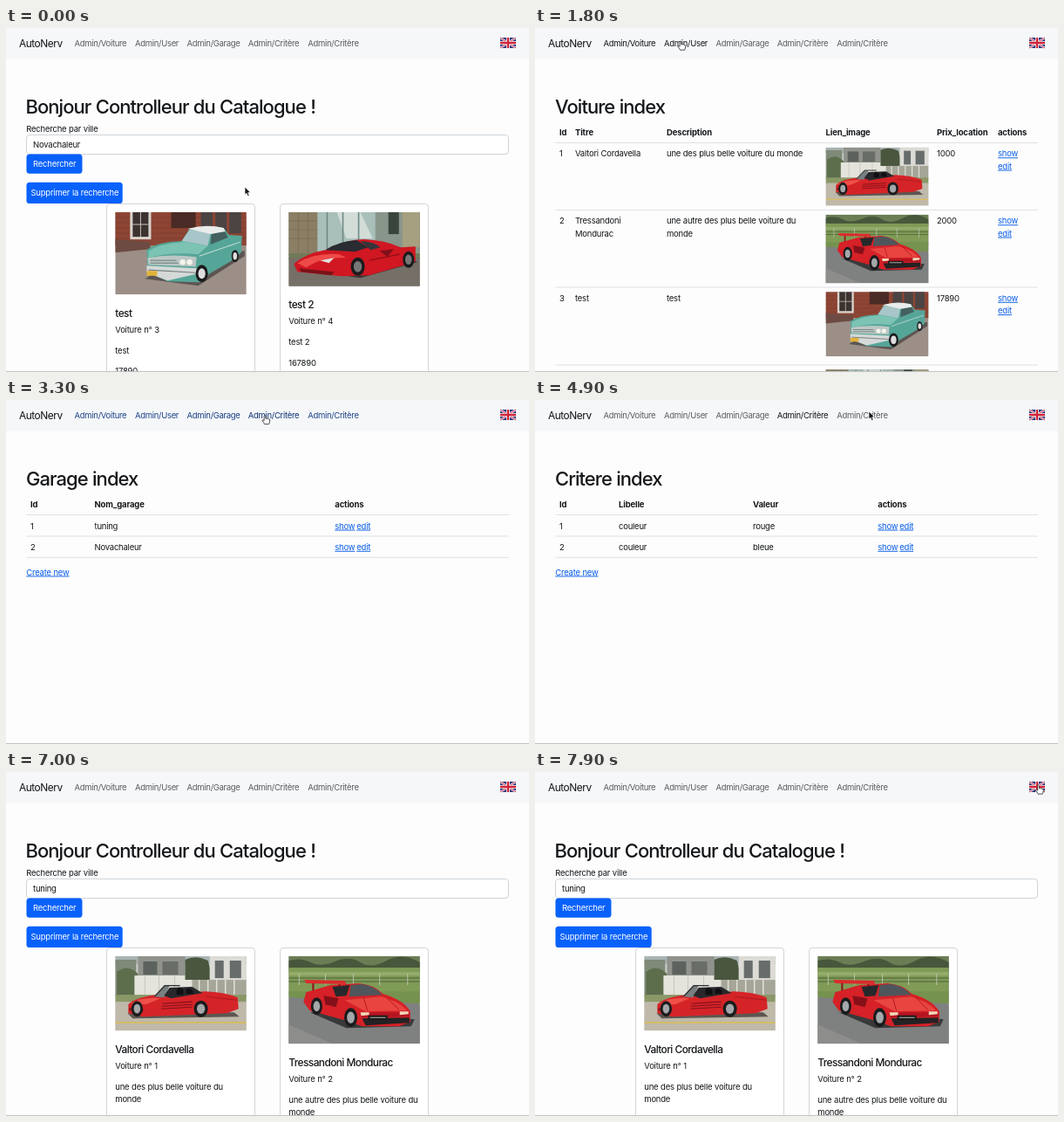
An HTML page that plays this animation: 600 px wide and 394 px high, repeating every 8000 ms.

```html
<!DOCTYPE html>
<html lang="fr">
<head>
<meta charset="utf-8">
<title>Catalogue</title>
<style>
html, body { margin: 0; width: 100%; height: 100%; overflow: hidden; background: #fdfdfd; }
svg { display: block; width: 600px; height: 394px; }
text { font-family: Inter, "Liberation Sans", sans-serif; font-size: 9.5px; letter-spacing: -.23px; word-spacing: .25px;
  font-optical-sizing: none; fill: #14171a; white-space: pre; }
.h1 { font-size: 22px; font-weight: 550; letter-spacing: -.95px; word-spacing: .4px; }
.h5 { font-size: 11.9px; font-weight: 550; letter-spacing: -.58px; }
.brand { font-size: 11.9px; letter-spacing: -.47px; fill: #121315; }
.nav { letter-spacing: -.31px; }
.th { font-weight: 700; letter-spacing: -.15px; }
.link { fill: #0b5fe8; text-decoration: underline; }
.btn { fill: #fff; }
</style>
</head>
<body>
<svg id="stage" viewBox="0 0 600 394"></svg>
<script>
const LOOP = 8000, STEP = 100;
const BRAND = 'AutoNerv';
const GARAGE = 'Novachaleur';
const CAR1 = 'Valtori Cordavella';
const CAR2 = ['Tressandoni', 'Mondurac'];

const text = (x, y, s, cls = '') => `<text x="${x}" y="${y}" class="${cls}">${s}</text>`;
const rect = (x, y, w, h, fill, more = '') =>
  `<rect x="${x}" y="${y}" width="${w}" height="${h}" fill="${fill}" ${more}/>`;
const path = (d, fill, more = '') => `<path d="${d}" fill="${fill}" ${more}/>`;
const line = (d, color, w = 1) => path(d, 'none', `stroke="${color}" stroke-width="${w}"`);
const rule = y => rect(23.5, y, 553.5, 1, '#dee2e6');
const wheel = (x, y, rx, ry, rim = '#a5a8aa') =>
  `<ellipse cx="${x}" cy="${y}" rx="${rx}" ry="${ry}" fill="#1b1b1d"/>` +
  `<ellipse cx="${x}" cy="${y}" rx="${rx * .58}" ry="${ry * .6}" fill="${rim}"/>`;

// Pictures, 150 units wide, as flat shapes
const pics = {
  teal: { h: 94, art:
    rect(0, 0, 150, 94, '#9c8f88') + rect(0, 0, 150, 38, '#8d4534') +
    line('M0 6H150M0 12H150M0 18H150M0 24H150M0 30H150', '#7b3a2c', .6) +
    rect(17, 0, 24, 31, '#d8d3cc') + rect(20, 0, 18, 28, '#3c3230') + line('M29 0V28M20 14H38', '#c9c2ba', 1) +
    rect(64, 0, 28, 18, '#4a2a25') + rect(98, 0, 46, 24, '#4b4443') + line('M113 0V24M129 0V24', '#8d4534', 3) +
    path('M0 31L40 34V42L0 46Z', '#6d4b42') +
    path('M34 76L95 84L148 50V44L60 60Z', '#5d5552') +
    path('M36 43Q48 34 76 33L85 19Q105 14 124 18L130 26L145 27L144 46L132 56L108 70L97 80L60 79L37 68Z', '#55a698') +
    path('M38 44Q52 36 78 34L106 38L95 48Q64 45 38 52Z', '#7cc3b4') +
    path('M76 33L85 20L109 24L106 38Z', '#a8c6c9') + path('M110 25L125 21L129 29L109 37Z', '#44605f') +
    path('M83 19Q104 13 124 18L126 22L109 25Z', '#e9ecea') +
    path('M37 52Q62 47 93 51L92 62L38 60Z', '#bcc7c5') + line('M40 55H70M40 58H72', '#60706e', .9) +
    path('M36 61L94 64L95 70L60 78L36 69Z', '#d5d9d8') + line('M38 66L92 69', '#75807e', 1.2) +
    line('M96 50L143 34', '#c5ddd6', 1) +
    '<circle cx="77" cy="57" r="3.2" fill="#f4f4ec"/><circle cx="85" cy="57" r="3.2" fill="#f4f4ec"/>' +
    wheel(99, 70, 7, 10, '#dedede') + wheel(137, 50, 4, 7, '#dedede') + rect(36, 67, 12, 5.5, '#e2b33a') },

  coupe: { h: 84.5, art:
    rect(0, 0, 150, 84.5, '#7b7568') + rect(0, 0, 150, 50, '#8e9a8c') +
    rect(0, 0, 33, 48, '#8b7e65') + line('M0 10H33M0 20H33M0 30H33M11 0V48M22 0V48', '#776b55', .7) +
    rect(33, 0, 66, 46, '#a9bfba') + path('M55 0L66 30H96L82 0Z', '#d2ddd8') + line('M44 0V44M62 0V40M80 0V34', '#6e8985', 1.6) +
    rect(100, 0, 50, 44, '#88958a') + rect(114, 0, 12, 25, '#39453b') + rect(130, 0, 20, 40, '#a69f80') +
    rect(0, 47, 150, 7, '#6f7a58') + path('M0 52H150V84.5H0Z', '#756f68') +
    path('M6 64L82 75L147 57L140 53Z', '#393635') +
    path('M6 59Q20 46 48 42Q66 31 86 31Q110 32 128 40L145 39V56L130 61L92 72L60 73L10 68Z', '#d01722') +
    path('M42 43Q58 33 78 32L91 40L76 45Z', '#292c31') + path('M82 33Q98 34 105 40L94 43Z', '#35363a') +
    path('M10 58Q30 46 58 48L66 52Q38 51 20 63Z', '#ee4a48') + line('M92 55L127 48', '#8f0d17', 1.4) +
    path('M12 64L52 68L49 72L14 68Z', '#7b1118') + path('M104 44L120 42L113 51Z', '#811019') +
    path('M36 55L52 52L46 58Z', '#dfe1df') + wheel(79, 62, 8, 10.5, '#777') + wheel(137, 54, 6.5, 9.5, '#777') },

  spider: { h: 85, art:
    rect(0, 0, 150, 85, '#cfd0cc') + rect(0, 0, 150, 9, '#a9b4b4') +
    rect(0, 4, 24, 42, '#808a78') + path('M2 18Q14 8 26 20V46H2Z', '#5d6e4d') +
    rect(26, 0, 54, 27, '#8f938b') + rect(32, 6, 16, 15, '#5c625d') + rect(54, 6, 18, 15, '#686d68') +
    rect(22, 22, 66, 24, '#e4e3dc') + line('M34 22V46M50 22V46M68 22V46', '#bfc0b8', .8) +
    path('M80 4Q92 -2 106 5L112 27H80Z', '#4a563e') +
    rect(108, 0, 42, 30, '#dcdbd5') + rect(114, 5, 10, 20, '#676d6b') + rect(131, 5, 13, 20, '#676d6b') +
    rect(88, 27, 62, 20, '#a5a698') + line('M96 27V46M106 27V46M116 27V46M126 27V46M136 27V46', '#e1e1d9', 1.5) +
    rect(0, 44, 150, 9, '#8a9868') + rect(0, 52, 150, 33, '#bfb9aa') +
    rect(0, 75, 150, 1.8, '#d8bd62') + path('M14 65L136 64L142 69L20 71Z', '#5d5650') +
    path('M15 55Q22 47 48 44L62 45L102 40Q126 41 140 47L141 60L128 65L32 69L15 65Z', '#d52428') +
    path('M44 46L56 33L62 34L56 47Z', '#777f80') + path('M56 45L62 36L88 35L100 42L64 48Z', '#28282c') +
    line('M45 46L57 33.5H74', '#2d2d30', 1.2) +
    path('M70 38Q74 33 78 39V44H70ZM81 38Q85 34 89 40V43H81Z', '#111113') +
    path('M17 54Q32 46 52 48L35 55Z', '#ef5048') + path('M16 59L32 60V63L16 62Z', '#7c1a1c') +
    line('M54 54L88 52M53 57L88 55M53 60L88 58', '#82101b', 1.1) + line('M104 46L139 50', '#a81a20', 1) +
    wheel(25, 60, 6.5, 9) + wheel(98, 60, 8, 9.5) },

  wedge: { h: 100, art:
    rect(0, 0, 150, 100, '#7f807d') + rect(0, 0, 150, 18, '#6b7d55') +
    path('M0 11V5Q14 1 25 7T53 6T82 7T112 5T150 7V14H0Z', '#47573b') +
    rect(0, 13, 150, 30, '#7f9b56') + rect(0, 18, 150, 4, '#94ab6a') +
    line('M0 25H150M0 29H150', '#4f603f', 1) +
    line('M12 20V33M42 20V33M74 20V33M104 20V33M136 20V33', '#c9cfbf', .8) +
    path('M0 40H150V54L0 47Z', '#76924f') + path('M0 47L150 56V100H0Z', '#7f8080') + path('M0 78L50 100H0Z', '#8d8d8c') +
    path('M24 64L66 82L140 80L144 72Z', '#39393b') +
    path('M20 41L48 33L80 31Q96 32 108 43Q132 50 139 63L139 75L126 80L84 80L64 73L24 62L17 52Z', '#d52127') +
    path('M18 27L64 28L66 32L20 31Z', '#dc2a2c') + line('M28 31V39M58 32V35', '#941018', 2) +
    path('M50 35L70 33L66 45L54 46Z', '#26292c') + path('M71 33L84 32Q98 34 107 44L69 46Z', '#4f565b') +
    path('M64 50L106 46Q129 53 135 62L88 63Z', '#e84540') + line('M86 48L90 62M112 47L126 61', '#b3121c', .9) +
    path('M82 64L138 64V69L83 70Z', '#b51520') + path('M84 71L138 70V76L88 79Z', '#242224') +
    path('M82 64L92 64V67L83 68ZM127 63L137 63V66L127 67Z', '#f1d7b8') +
    rect(91, 67.5, 22, 5.2, '#1a1a1b') + line('M93 70H111', '#b9b9b5', 1.2) +
    path('M40 45L57 48L54 58L42 55Z', '#851019') +
    wheel(32, 57, 6.5, 10) + wheel(71, 70, 7.5, 11) },
};

const symbols = Object.entries(pics).map(([id, p]) =>
  `<symbol id="${id}" viewBox="0 0 150 ${p.h}" preserveAspectRatio="none">${p.art}</symbol>`).join('');
const pic = (id, x, y, w) => `<use href="#${id}" x="${x}" y="${y}" width="${w}" height="${pics[id].h * w / 150}"/>`;

const card = (x, id, title, num, lines) => {
  const b = 210.6 + pics[id].h;
  return rect(x + .5, 201.5, 170, 230, '#fff', 'rx="3.5" stroke="#d3d4d6"') + pic(id, x + 10.3, 211, 150.5) +
    text(x + 10.3, b + 26, title, 'h5') + text(x + 10.3, b + 44, 'Voiture n° ' + num) +
    lines.map(([dy, s]) => text(x + 10.3, b + dy, s)).join('');
};

const catalogue = (city, cards) =>
  text(22.5, 98, 'Bonjour Controlleur du Catalogue !', 'h1') + text(23.3, 118.5, 'Recherche par ville') +
  rect(23.5, 122.5, 553, 22, '#fff', 'rx="3.5" stroke="#ced4da"') + text(31, 136.7, city) +
  rect(23.5, 144.5, 64, 22.3, '#0961fb', 'rx="3.6"') + text(31, 159.2, 'Rechercher', 'btn') +
  rect(23.5, 176.7, 110.2, 24.3, '#0961fb', 'rx="3.6"') + text(28.5, 192.4, 'Supprimer la recherche', 'btn') + cards;

const heads = (title, xs, names) => text(23, 98, title, 'h1') +
  names.map((n, i) => text(xs[i], 123.3, n, 'th')).join('') + rule(131);

const smallTable = (title, xs, names, rows) => heads(title, xs, names) +
  rows.map((r, i) => {
    const y = 147.6 + i * 24.2, ax = xs[xs.length - 1];
    return r.map((s, k) => text(xs[k], y, s)).join('') +
      text(ax, y, 'show', 'link') + text(ax + 25, y, 'edit', 'link') + rule(155.5 + i * 24.3);
  }).join('') + text(23.3, 200.5, 'Create new', 'link');

const carTable = () => {
  const xs = [28, 46, 151, 333.5, 461, 531];
  const rows = [
    [131, 'spider', [CAR1], ['une des plus belle voiture du monde'], 1000],
    [208, 'wedge', CAR2, ['une autre des plus belle voiture du', 'monde'], 2000],
    [296.5, 'teal', ['test'], ['test'], 17890],
    [385.5, 'coupe', ['test 2'], ['test 2'], 167890],
  ];
  return heads('Voiture index', xs, ['Id', 'Titre', 'Description', 'Lien_image', 'Prix_location', 'actions']) +
    rows.map(([top, id, name, desc, price], i) => {
      const y = top + 16.3, stack = (x, a, cls) => a.map((s, k) => text(x, y + k * 14.3, s, cls)).join('');
      return (i ? rule(top) : '') + text(xs[0], y, i + 1) + stack(xs[1], name) + stack(xs[2], desc) +
        pic(id, xs[3], top + 5.7, 118) + text(xs[4], y, price) + stack(xs[5], ['show', 'edit'], 'link');
    }).join('');
};

const pages = {
  found: catalogue(GARAGE,
    card(115, 'teal', 'test', 3, [[68, 'test'], [91.5, '17890']]) +
    card(314, 'coupe', 'test 2', 4, [[68, 'test 2'], [91.5, '167890']])),
  cars: carTable(),
  garages: smallTable('Garage index', [28, 101.5, 377.3], ['Id', 'Nom_garage', 'actions'],
    [['1', 'tuning'], ['2', GARAGE]]),
  criteria: smallTable('Critere index', [28, 96, 250, 393.3], ['Id', 'Libelle', 'Valeur', 'actions'],
    [['1', 'couleur', 'rouge'], ['2', 'couleur', 'bleue']]),
  all: catalogue('tuning',
    card(115, 'spider', CAR1, 1, [[68, 'une des plus belle voiture du'], [82, 'monde']]) +
    card(314, 'wedge', CAR2.join(' '), 2, [[68, 'une autre des plus belle voiture du'], [82, 'monde']])),
};

const flag = '<g transform="translate(567 11)">' + rect(0, 0, 18, 12, '#27357e') +
  line('M0 0L18 12M18 0L0 12', '#f0f0f4', 2.2) + line('M0 0L18 12M18 0L0 12', '#cf2439', .9) +
  line('M9 0V12M0 6H18', '#f0f0f4', 4) + line('M9 0V12M0 6H18', '#cf2439', 2.3) + '</g>';

const tabs = [[78.6, 'Voiture'], [148, 'User'], [207.6, 'Garage'], [277.8, 'Critère'], [346.2, 'Critère']];

const stage = document.getElementById('stage');
stage.innerHTML = `<defs>${symbols}</defs>` + rect(0, 0, 600, 394, '#fdfdfd') +
  Object.entries(pages).map(([id, s]) => `<g id="p-${id}">${s}</g>`).join('') +
  rect(0, 0, 600, 35.5, '#f5f7f9') + text(15, 21.5, BRAND, 'brand') +
  tabs.map(([x, s]) => text(x, 20.6, 'Admin/' + s, 'nav')).join('') + flag +
  rect(0, 393, 600, 1, '#c2c2c4') +
  '<g id="cursor">' +
  path('M0 0V9L2 7.2L3.5 10.6L5.1 9.9L3.7 6.6H6.4Z', '#111', 'stroke="#fff" stroke-width=".7"') +
  path('M-.9 .8Q0-.6 .9 .8V4Q1.8 3.2 2.6 4.2Q3.5 3.6 4.2 4.6Q5.6 4.2 5.7 5.8Q5.8 8.4 4.6 10.4H-.4Q-1.5 8.2-3.2 6.4Q-2.6 5-.9 6.4Z',
    '#fff', 'stroke="#222" stroke-width=".8" transform="translate(0 -1.2)"') + '</g>';

const groups = Object.keys(pages).map(id => [id, document.getElementById('p-' + id)]);
const navs = [...stage.querySelectorAll('.nav')];
const cursor = document.getElementById('cursor');
const [arrow, hand] = cursor.children;

// [time, page]; each load fades the tabs from link blue
const loads = [[-999, 'found'], [1400, 'cars'], [2300, 'garages'], [3250, 'garages'], [3700, 'criteria'], [5300, 'criteria'], [6200, 'all']];
// [from, to] while each tab is dark
const dark = [[850, 2300], [1200, 2400], [2300, 3200], [3150, 5250], [5000, 5800]];
// [time, x, y, hand on arrival]
const track = [[0, 274, 182, 0], [200, 262, 160, 0], [300, 262, 160, 0], [850, 110, 16, 1], [1050, 112, 16, 0],
  [1200, 154, 16, 0], [1500, 167, 16, 1], [2000, 167, 16, 1], [2350, 238, 17, 1], [2950, 240, 17, 1],
  [3250, 297, 18.5, 1], [4500, 300, 17, 1], [4900, 383, 13, 0], [5100, 376, 16, 1], [5600, 376, 16, 1],
  [6050, 40, 15, 1], [6500, 42, 15, 1], [6800, 120, -16, 0], [7100, 540, -16, 0], [7400, 577.5, 16, 1], [8000, 577.5, 16, 1]];

const clamp = v => Math.max(0, Math.min(1, v));
const ease = v => v * v * (3 - 2 * v);
const mix = (a, b, k) => a.map((v, i) => v + (b[i] - v) * k);
const GREY = [90, 93, 97], DARK = [22, 23, 25], BLUE = [12, 60, 150];

function draw(ms) {
  const t = Math.floor(ms / STEP) * STEP;
  const [start, page] = loads.filter(l => l[0] <= t).pop();
  groups.forEach(([id, g]) => g.style.display = id === page ? '' : 'none');

  const fresh = ease(clamp((t - start) / 150));
  navs.forEach((n, i) => {
    const [from, to] = dark[i];
    const k = clamp((t - from) / 150) * clamp((to + 150 - t) / 150);
    n.style.fill = `rgb(${mix(BLUE, mix(GREY, DARK, k), fresh).map(Math.round)})`;
  });

  const i = track.findIndex(p => p[0] > t), a = track[i - 1], b = track[i];
  const [x, y] = mix([a[1], a[2]], [b[1], b[2]], ease((t - a[0]) / (b[0] - a[0])));
  cursor.setAttribute('transform', `translate(${x} ${y})`);
  arrow.style.display = a[3] ? 'none' : '';
  hand.style.display = a[3] ? '' : 'none';
}

const t0 = performance.now();
function tick() {
  draw((performance.now() - t0) % LOOP);
  requestAnimationFrame(tick);
}
tick();
</script>
</body>
</html>
```
